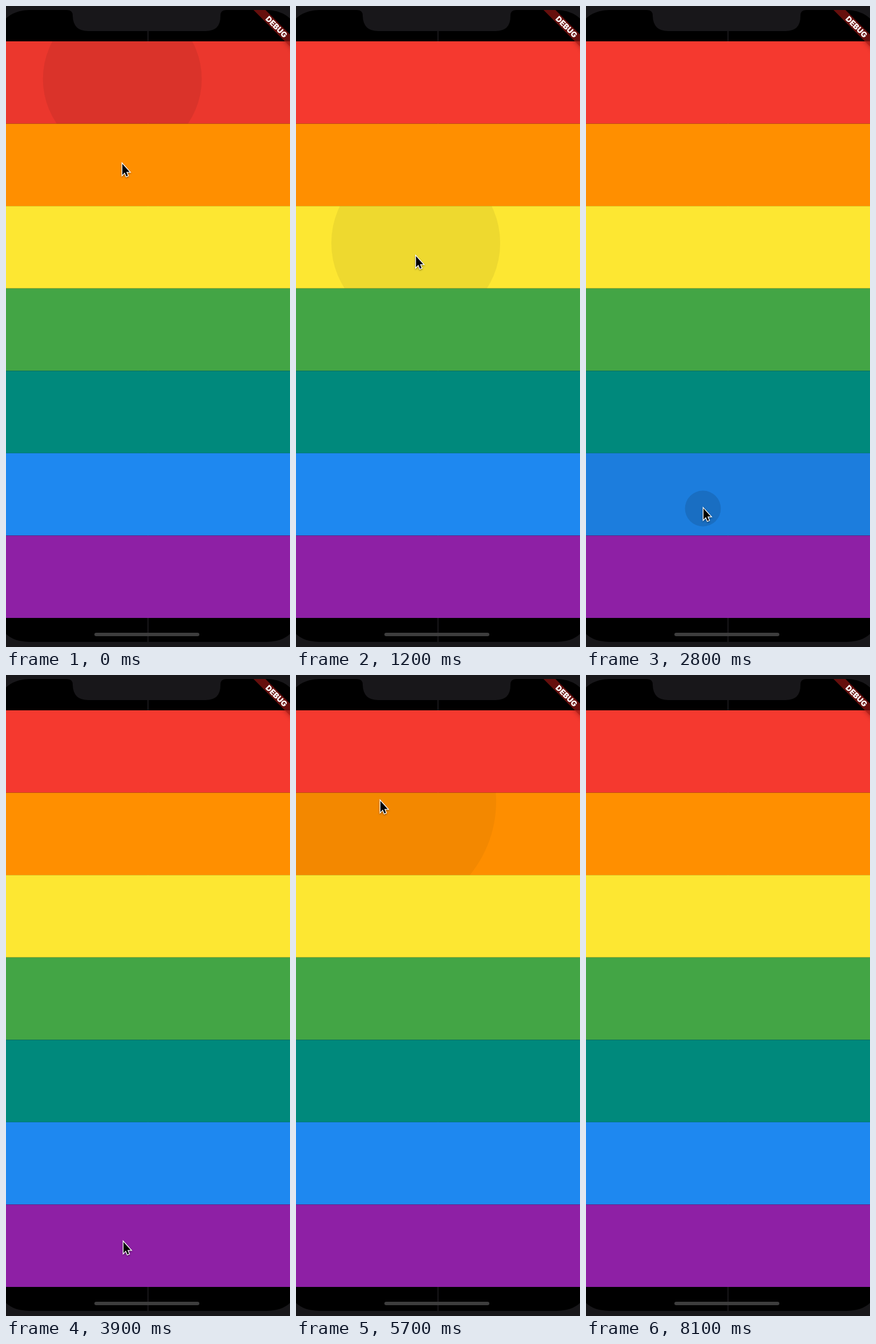
Recreate the animation shown at these times as an HTML page with a canvas. Size 498 by 1125 pixels, loop 8.7 s.

```html
<!DOCTYPE html>
<html>
<head>
<meta charset="utf-8">
<style>
html, body { margin: 0; width: 100%; height: 100%; overflow: hidden; background: #18171a; }
canvas { display: block; }
</style>
</head>
<body>
<canvas width="498" height="1125"></canvas>
<script>
const ctx = document.querySelector('canvas').getContext('2d');
const W = 498, H = 1125, LOOP = 8700, STEP = 100, HIDE_CURSOR = 8100;
const DP = 1.237, LEFT = -9, RIGHT = 504, TOP = 7, BOTTOM = 1116;
const ROW_TOP = 62, ROW_H = 1012 / 7;
const FADE = 200, HOLD = 130, TRAVEL = 400, REST = 80;
const BEZEL = '#18171a';
const colors = ['#f5392f', '#ff8f00', '#fde732', '#43a545', '#00897c', '#1e88f0', '#8e20a5'];

const tap = (press, x, y, hold = HOLD) => ({ press, x, y, hold });
const taps = [
  tap(-210, 204, 128), tap(400, 203, 278), tap(1020, 210, 416, 80), tap(1580, 206, 570),
  tap(2130, 205, 722), tap(2700, 205, 882), tap(3260, 205, 996),
  tap(4590, 149, 126), tap(5445, 147, 222), tap(7584, 228, 448)
];

const clamp = v => Math.max(0, Math.min(1, v));
const ease = u => u * u * (3 - 2 * u);

const corner = new Path2D(`M250 ${TOP} H45 C22 ${TOP} 10 13 0 22 V1102 C10 1111 22 ${BOTTOM} 45 ${BOTTOM} H250Z`);
const screen = new Path2D(corner);
screen.addPath(corner, new DOMMatrix([-1, 0, 0, 1, W, 0]));
const notch = new Path2D(`M107 ${TOP} Q117 ${TOP} 117 17 V18 Q118 44 144 44 H350
  Q376 44 376 18 V17 Q376 ${TOP} 386 ${TOP}Z`);
const arrow = new Path2D('M0 0 V19.5 L4.2 15.2 L7 22 L9.8 20.8 L7 14.2 H12.8Z');

function rect(color, x, y, w, h) {
  ctx.fillStyle = color;
  ctx.fillRect(x, y, w, h);
}

function fill(color, path) {
  ctx.fillStyle = color;
  ctx.fill(path);
}

function drawRipple({ press, x, y, hold }, t) {
  const age = t - press, released = Math.max(0, age - hold);
  if (age <= 0 || released >= FADE) return;
  const top = ROW_TOP + Math.floor((y - ROW_TOP) / ROW_H) * ROW_H;
  const reach = Math.hypot(Math.max(x - LEFT, RIGHT - x), Math.max(y - top, top + ROW_H - y));
  const held = Math.min(age, hold);
  const radius = Math.min(reach, reach * held / 1000 + released * DP);
  const glow = clamp((held - released) / FADE);
  const disc = new Path2D();
  disc.arc(x, y, radius, 0, 7);
  ctx.save();
  ctx.beginPath();
  ctx.rect(0, top, W, ROW_H);
  ctx.clip();
  rect(`rgba(0,0,0,${0.16 * glow})`, 0, top, W, ROW_H);
  fill(`rgba(0,0,0,${0.12 * (1 - released / FADE)})`, disc);
  ctx.restore();
}

function drawBanner() {
  ctx.save();
  ctx.clip(screen);
  ctx.translate(RIGHT, TOP);
  ctx.rotate(Math.PI / 4);
  ctx.shadowColor = 'rgba(0,0,0,.5)';
  ctx.shadowBlur = 8;
  rect('rgba(170,25,22,.6)', -60, 28 * DP, 120, 12 * DP);
  ctx.shadowColor = 'transparent';
  ctx.fillStyle = '#fff';
  ctx.font = '900 13.5px Inter, Roboto, sans-serif';
  ctx.textAlign = 'center';
  ctx.textBaseline = 'middle';
  ctx.fillText('DEBUG', 0, 34 * DP + 0.7);
  ctx.restore();
}

// The pointer waits on each tap, then glides to the next one just before pressing it.
function cursorAt(t) {
  const next = taps.findIndex(p => p.press > t);
  const b = taps[next < 0 ? taps.length - 1 : next];
  const a = next < 0 ? b : taps[Math.max(1, next - 1)];
  const e = ease(clamp(1 - (b.press - REST - t) / TRAVEL));
  return [a.x + (b.x - a.x) * e + 1, a.y + (b.y - a.y) * e - 1];
}

function drawCursor(t) {
  ctx.save();
  ctx.translate(...cursorAt(t));
  ctx.shadowColor = 'rgba(0,0,0,.4)';
  ctx.shadowBlur = 3;
  ctx.shadowOffsetY = 1.5;
  ctx.strokeStyle = '#fff';
  ctx.lineWidth = 2.6;
  ctx.miterLimit = 4;
  ctx.stroke(arrow);
  ctx.shadowColor = 'transparent';
  fill('#000', arrow);
  ctx.restore();
}

function draw(t) {
  rect(BEZEL, 0, 0, W, H);
  fill('#000', screen);
  colors.forEach((c, i) => rect(c, 0, ROW_TOP + i * ROW_H, W, ROW_H));
  taps.forEach(p => drawRipple(p, t));
  drawBanner();
  fill(BEZEL, notch);
  const home = new Path2D();
  home.roundRect(155, 1100, 184, 6, 3);
  fill('#3d3d3d', home);
  if (t < HIDE_CURSOR) drawCursor(t);
}

const start = performance.now();
function tick() {
  const t = (performance.now() - start) % LOOP;
  draw(Math.floor(t / STEP) * STEP);
  requestAnimationFrame(tick);
}
tick();
</script>
</body>
</html>
```
